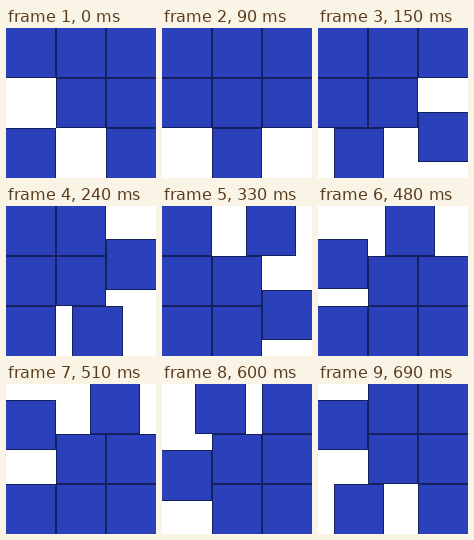
An HTML page with a canvas that plays this animation: 150 by 150 pixels, repeating every 720 ms.

```html
<!DOCTYPE html>
<html>
<head>
<meta charset="utf-8">
<style>
html, body { margin: 0; width: 100%; height: 100%; overflow: hidden; background: #fff; }
canvas { display: block; }
</style>
</head>
<body>
<canvas width="150" height="150"></canvas>
<script>
const ctx = document.querySelector('canvas').getContext('2d');
const STEP = 30, SHIFT = 17;
// Columns and rows share these spans; the outer ones reach past the stage by a pixel.
const start = [-1, 50, 100], size = [51, 50, 51];
// Outer cells in the order the two gaps travel; the tiles go the other way.
const ring = [[0, 1], [0, 2], [1, 2], [2, 2], [2, 1], [2, 0], [1, 0], [0, 0]];
const cell = i => ring[i % 8];

function tile([col, row], dx = 0, dy = 0) {
  const x = start[col] + dx, y = start[row] + dy;
  ctx.fillRect(x, y, size[col], size[row]);
  ctx.strokeRect(x + 0.5, y + 0.5, size[col] - 1, size[row] - 1);
}

function draw() {
  const tick = Math.floor(performance.now() % 720 / STEP);
  const move = Math.floor(tick / 3), shift = tick % 3 * SHIFT;
  ctx.clearRect(0, 0, 150, 150);
  ctx.fillStyle = '#2b41bb';
  ctx.strokeStyle = '#15205e';
  tile([1, 1]);
  for (const k of [4, 5, 6, 7]) tile(cell(move + k));
  for (const k of [1, 3]) {
    const from = cell(move + k), to = cell(move + k - 1);
    tile(from, (to[0] - from[0]) * shift, (to[1] - from[1]) * shift);
  }
  requestAnimationFrame(draw);
}
draw();
</script>
</body>
</html>
```
